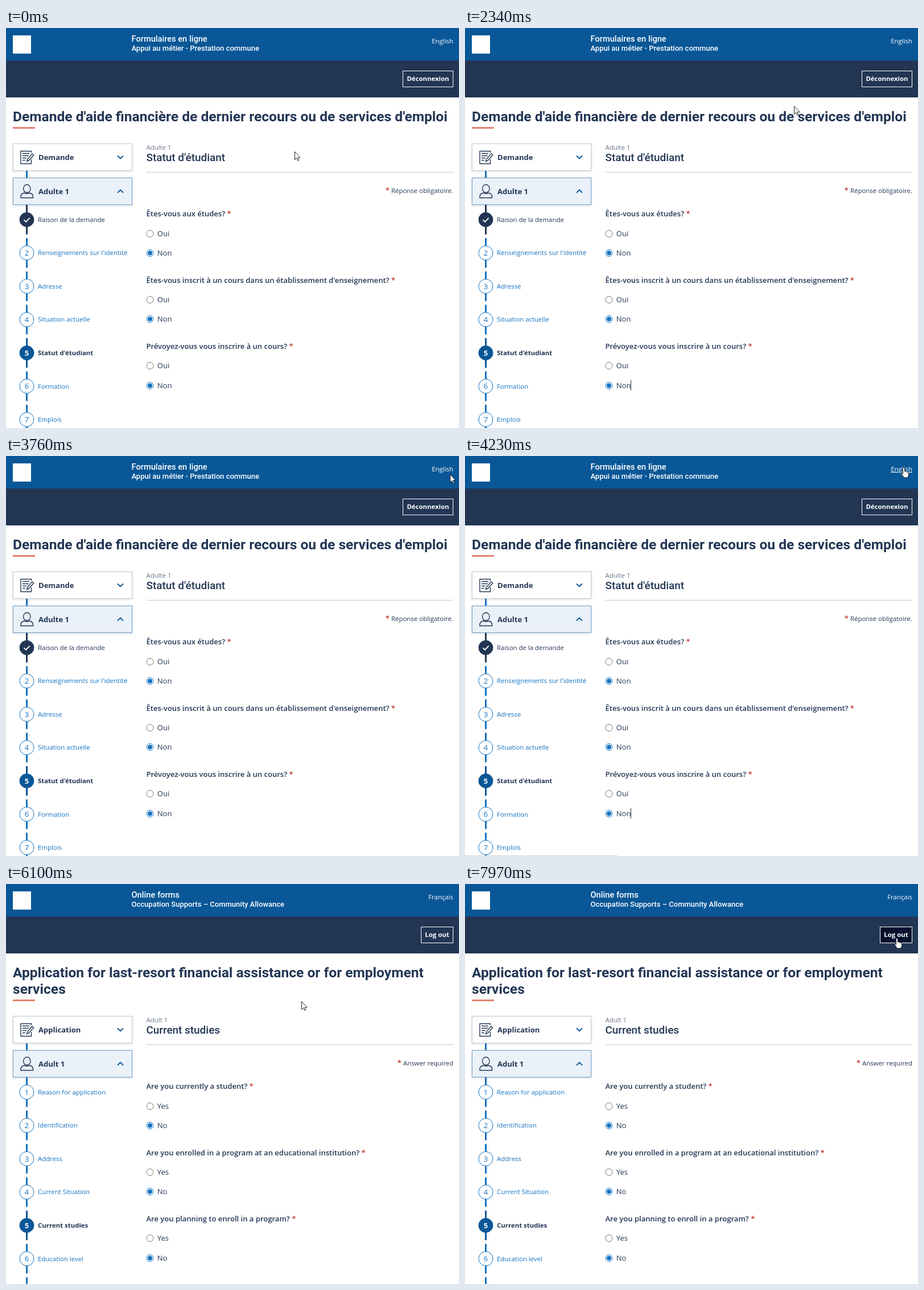
These frames come from a looping animation (796x703 px, 8000 ms). An HTML page:

```html
<!DOCTYPE html>
<html lang="fr">
<head>
<meta charset="utf-8">
<title>Form</title>
<style>
  html, body { margin: 0; width: 100%; height: 100%; overflow: hidden; background: #fff; }
  svg { display: block; }
  text { white-space: pre; }
  .card { filter: drop-shadow(0 1px 2px #22365430); }
  .line { fill: none; stroke: #223654; stroke-width: 1.4; }
</style>
</head>
<body>
<svg id="stage" width="796" height="703" viewBox="0 0 796 703"></svg>
<script>
const NAVY = '#223654', BLUE = '#095797', LINK = '#1472bf', RED = '#c3342b';
const LOOP = 8000, SWITCH = 6100;

const sans = (weight, size) => `${weight} ${size}px 'Open Sans',sans-serif`;
const roboto = (weight, size) => `${weight} ${size}px Roboto,sans-serif`;
const SMALL = sans(400, 11.41), BODY = sans(400, 13.04);

// Baselines sit on whole pixels
const text = (x, y, font, content, fill = NAVY, extra = '') =>
  `<text x="${x}" y="${Math.round(y)}" style="font:${font}" fill="${fill}" ${extra}>${content}</text>`;
const rect = (x, y, w, h, fill, extra = '') =>
  `<rect x="${x}" y="${y}" width="${w}" height="${h}" fill="${fill}" ${extra}/>`;
const star = `<tspan fill="${RED}" style="font:${sans(600, 13.04)}">*</tspan>`;

const languages = [
  {
    form: 'Formulaires en ligne', program: 'Appui au métier - Prestation commune',
    other: 'English', logout: 'Déconnexion', buttonX: 697.5, shift: 0,
    title: ["Demande d'aide financière de dernier recours ou de services d'emploi"],
    cards: ['Demande', 'Adulte 1'], heading: "Statut d'étudiant", required: 'Réponse obligatoire.',
    steps: ['Raison de la demande', "Renseignements sur l'identité", 'Adresse', 'Situation actuelle',
      "Statut d'étudiant", 'Formation', 'Emplois'],
    firstDone: true, options: ['Oui', 'Non'],
    questions: ['Êtes-vous aux études?', "Êtes-vous inscrit à un cours dans un établissement d'enseignement?",
      'Prévoyez-vous vous inscrire à un cours?'],
  },
  {
    form: 'Online forms', program: 'Occupation Supports – Community Allowance',
    other: 'Français', logout: 'Log out', buttonX: 729.5, shift: 29,
    title: ['Application for last-resort financial assistance or for employment', 'services'],
    cards: ['Application', 'Adult 1'], heading: 'Current studies', required: 'Answer required',
    steps: ['Reason for application', 'Identification', 'Address', 'Current Situation',
      'Current studies', 'Education level', ''],
    firstDone: false, options: ['Yes', 'No'],
    questions: ['Are you currently a student?', 'Are you enrolled in a program at an educational institution?',
      'Are you planning to enroll in a program?'],
  },
];

function step(label, i, firstDone) {
  const y = 336.8 + 58.55 * i, done = firstDone && i === 0, current = i === 4;
  const color = done ? NAVY : current ? BLUE : LINK;
  const mark = done
    ? `<path d="M31.5 ${y + .3}l3.6 3.6 6.6-7" fill="none" stroke="#fff" stroke-width="1.8"/>`
    : text(36.5, y + 4.7, sans(current ? 700 : 400, 13.04), i + 1, current ? '#fff' : LINK, 'text-anchor="middle"');
  return rect(35, y - 26, 3, 52, color) +
    `<circle cx="36.5" cy="${y}" r="12.5" stroke="${color}" fill="${done || current ? color : '#fff'}"/>` + mark +
    text(56, y + 4, current ? sans(700, 11.41) : SMALL, label, done || current ? NAVY : LINK);
}

function question(label, i, options) {
  const y = 331.4 + 116.4 * i;
  return text(246.5, y, sans(600, 13.04), `${label} ${star}`) + options.map((option, k) => {
    const base = Math.round(y + 34.2 * (k + 1)), cy = base - 4.5;
    return `<circle cx="253" cy="${cy}" r="6" fill="#fff" stroke="${k ? LINK : '#767676'}"/>` +
      (k ? `<circle cx="253" cy="${cy}" r="4" fill="${LINK}"/>` : '') + text(265.8, base, BODY, option);
  }).join('');
}

function card(y, label, open) {
  const chevron = open ? 'l5-5 5 5' : 'l5 5 5-5';
  return rect(12.5, y, 209, 47, open ? '#eaf1f9' : '#fff', `class="card" stroke="${open ? '#6f9fc9' : '#c5cad2'}"`) +
    text(57, y + 28.2, sans(700, 13.04), label) +
    `<path d="M196 ${y + (open ? 26 : 21)}${chevron}" fill="none" stroke="${BLUE}" stroke-width="1.9"/>`;
}

const formIcon = `<path class="line" d="M44.5 219V216.5H26V238.5H44.5V231M29 220.5H41M29 224.5H40M29 228.5H36M29 232.5H34
  M36.5 234.5l1.3-4L46 221l2.7 2.3-8.5 9.5z"/>`;
const personIcon = `<ellipse class="line" cx="36.8" cy="282.3" rx="6.3" ry="7"/>
  <path class="line" d="M26 298.5v-2q0-5.5 6.5-6.500q4.300 2 8.600 0q6.500 1 6.500 6.500v2z"/>`;

const page = (l, id) => `<g id="page${id}">` +
  rect(0, 0, 796, 57, BLUE) + rect(0, 57, 796, 65, NAVY) + rect(12, 13, 32, 32, '#fff') +
  text(220.5, 24, roboto(500, 14.65), l.form, '#fff') +
  text(220.5, 40, roboto(500, 13.02), l.program, '#fff') +
  text(786, 27, SMALL, l.other, '#fff', `id="other${id}" text-anchor="end"`) +
  rect(l.buttonX, 75.5, 785.5 - l.buttonX, 28, NAVY, `id="button${id}" stroke="#fff"`) +
  text((l.buttonX + 785.5) / 2, 93, sans(700, 11.41), l.logout, '#fff', 'text-anchor="middle"') +
  l.title.map((row, i) => text(12, 164 + 29 * i, roboto(700, 24.57), row)).join('') +
  `<g transform="translate(0 ${l.shift})">` +
  rect(12, 174, 39, 3, '#e58271') + rect(35, 250, 3, 14, LINK) +
  l.steps.map((label, i) => step(label, i, l.firstDone)).join('') +
  card(203.5, l.cards[0], false) + card(263.5, l.cards[1], true) + formIcon + personIcon +
  text(246.5, 214, SMALL, l.cards[1], '#6b778a') +
  text(246.5, 234, roboto(500, 18.9), l.heading) +
  rect(246.5, 253, 539.5, 1, '#c5cad2') +
  text(786, 290, SMALL, `${star} ${l.required}`, NAVY, 'text-anchor="end"') +
  l.questions.map((label, i) => question(label, i, l.options)).join('') +
  '</g></g>';

document.getElementById('stage').innerHTML = languages.map(page).join('') +
  rect(291, 619, 1, 18, NAVY, 'id="caret"') + rect(0, 702, 268, 1, '#d3d3d3', 'id="status"') +
  `<g id="cursor" fill="#fff" stroke="#000" stroke-width=".85" stroke-linejoin="round">
    <path id="arrow" d="M.5 .5V14.5L3.6 11.5 5.8 16.3 7.8 15.4 5.7 10.8H10Z"/>
    <path id="hand" d="M-1.5 11.5V1.7a1.5 1.5 0 0 1 3 0V7q2.5-1 2.8 .8 2.3-.6 2.5 1 1.7-.2 1.7 1.6V13q0 3-2 5H0q-1-3-4-6-.5-2 1-2z"/>
  </g>`;

// Pointer keys: time, x, y
const keys = [
  [0, 507, 217], [1950, 507, 217], [2340, 578, 137], [2440, 578, 135], [3010, 578, 135],
  [3400, 726, 44], [3790, 782, 31], [4080, 771, 20], [SWITCH - .1, 771, 20], [SWITCH, 519, 206],
  [6640, 519, 206], [7160, 309.5, 275], [7220, 306, 274], [7430, 414, 252], [7970, 759, 95], [LOOP, 759, 95],
];
const blinks = [100, 630, 1160, 1690, 2220, 2700, 3230, 3760, 4230, 4700];

// Tangent at a key; zero where the pointer rests
function slope(i, axis) {
  const before = keys[i - 1], here = keys[i], after = keys[i + 1];
  if (!before || !after || before[1] === here[1] || after[1] === here[1]) return 0;
  return (after[axis] - before[axis]) / (after[0] - before[0]);
}

function pointer(t) {
  const i = keys.findIndex((key, k) => k + 1 === keys.length - 1 || t < keys[k + 1][0]);
  const a = keys[i], b = keys[i + 1], span = b[0] - a[0], u = (t - a[0]) / span;
  const s = u * u * (3 - 2 * u);
  return [1, 2].map(axis => a[axis] + (b[axis] - a[axis]) * s +
    span * u * (1 - u) * (slope(i, axis) * (1 - u) - slope(i + 1, axis) * u));
}

const el = id => document.getElementById(id);
const show = (id, on) => el(id).setAttribute('display', on ? 'inline' : 'none');

function draw(t) {
  const english = t >= SWITCH, [x, y] = pointer(t).map(Math.round);
  const onLink = !english && x > 747 && x < 787 && y < 30;
  const onButton = english && x > 729 && x < 786 && y < 103;
  show('page0', !english);
  show('page1', english);
  show('caret', blinks.filter(time => time <= t).length % 2);
  show('status', t >= 4000 && !english);
  el('status').setAttribute('width', t < 5460 ? 268 : t < 5510 ? 320 : t < 5560 ? 365 : 386);
  el('other0').setAttribute('text-decoration', onLink ? 'underline' : 'none');
  el('button1').setAttribute('fill', onButton ? '#05122f' : NAVY);
  el('cursor').setAttribute('transform', `translate(${x} ${y})`);
  show('hand', onLink || onButton);
  show('arrow', !onLink && !onButton);
}

const start = performance.now();
function tick() {
  draw((performance.now() - start) % LOOP);
  requestAnimationFrame(tick);
}
tick();
</script>
</body>
</html>
```
